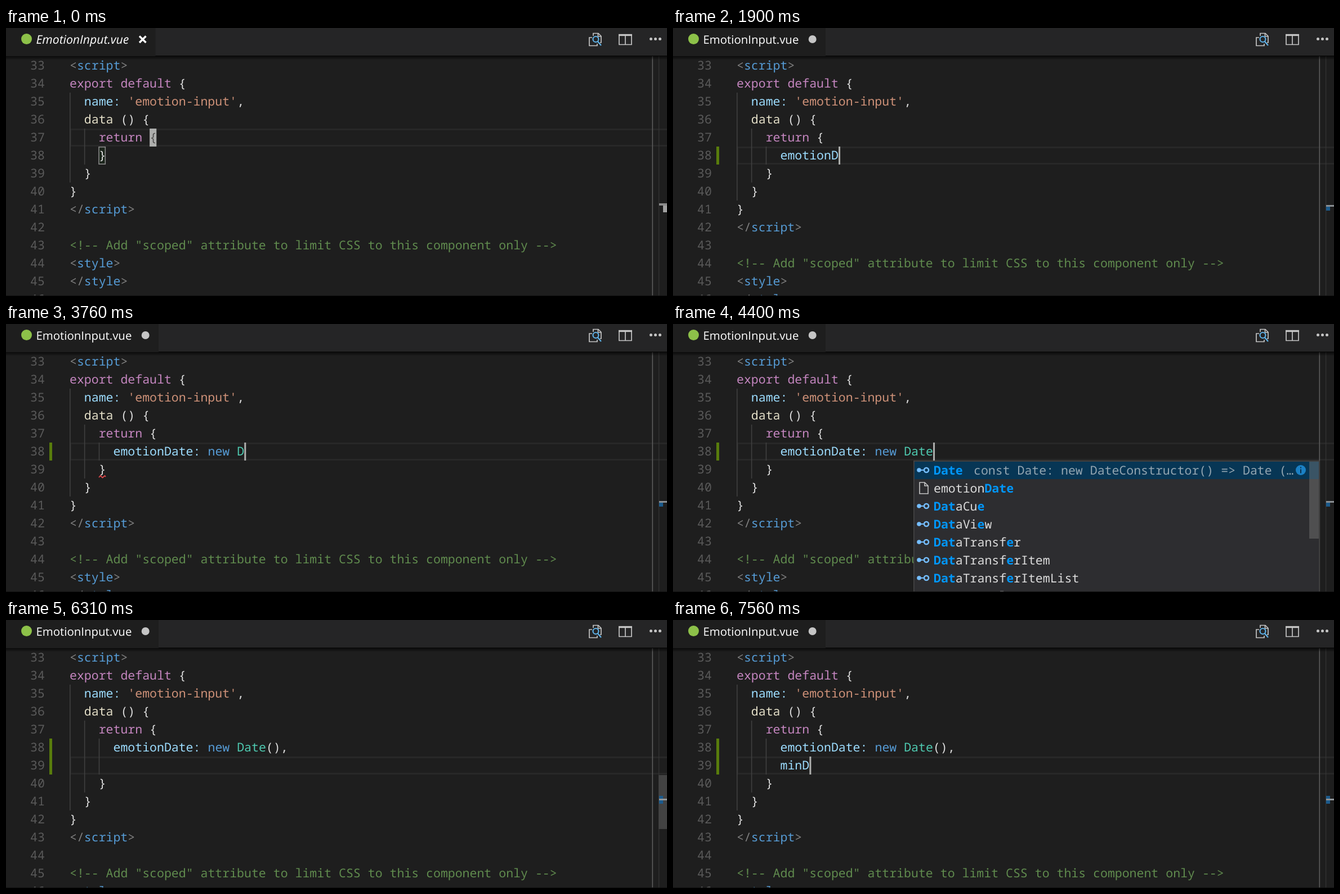
These frames come from a looping animation (1174 by 477 pixels, 8000 ms). An HTML page:

```html
<!DOCTYPE html>
<html lang="en">
<head>
<meta charset="utf-8">
<title>Typing in a code editor</title>
<style>
html, body { margin: 0; width: 100%; height: 100%; overflow: hidden; background: #1e1e1e; }
svg { display: block; }
text { text-rendering: geometricPrecision; white-space: pre; }
.mono { font: 21.53px "Noto Sans Mono", "DejaVu Sans Mono", monospace; }
.bold { font-weight: 700; }
.ui { font: 20.4px "Open Sans", "Noto Sans", sans-serif; }
.preview { font-size: 21.2px; font-style: italic; }
</style>
</head>
<body>
<svg id="stage" width="1174" height="477" viewBox="0 0 1174 477">
  <defs>
    <linearGradient id="shade" x2="0" y2="1">
      <stop offset="0" stop-color="#000" stop-opacity=".75"/>
      <stop offset="1" stop-color="#000" stop-opacity="0"/>
    </linearGradient>
  </defs>
  <rect width="1174" height="477" fill="#1e1e1e"/>
  <g id="editor"></g>
  <rect y="49" width="1174" height="8" fill="url(#shade)"/>
  <rect width="1174" height="49" fill="#252526"/>
  <g id="tab"></g>
  <circle cx="36.5" cy="19.5" r="9.5" fill="#8dc149"/>
  <g fill="none" stroke="#c5c5c5" stroke-width="1.7">
    <path d="M1043 14V9.500H1052L1057 14.500V26H1055M1041 17H1036V31.500H1050V28"/>
    <path d="M1051.500 9.500V15H1057"/>
    <g stroke="#5fb2e8" stroke-width="2.200">
      <circle cx="1047.500" cy="20" r="5"/>
      <path d="M1051 24L1057 31"/>
    </g>
    <path d="M1089 12H1111V29.500H1089ZM1100 12V30"/>
    <path d="M1088 12.500H1112" stroke-width="3.300"/>
  </g>
  <g fill="#c5c5c5">
    <circle cx="1145.500" cy="19.500" r="2.500"/>
    <circle cx="1153.500" cy="19.500" r="2.500"/>
    <circle cx="1161.500" cy="19.500" r="2.500"/>
  </g>
  <rect y="476" width="1174" height="1" fill="#111"/>
</svg>
<script>
const LOOP = 8000, CHAR = 12.92, LEFT = 113, LINE = 32, BASE = 23;
const COLORS = {
  w: '#dcdcdc', g: '#808080', t: '#569cd6', k: '#c586c0', p: '#9cdcfe', s: '#ce9178',
  f: '#e4dfc8', c: '#608b4e', d: '#4ec9b0', n: '#5a5a5a', h: '#0097fb', m: '#93a5b1'
};

// Each token starts with its colour key.
const HEAD = [
  ['g<', 'tscript', 'g>'],
  ['kexport default', 'w {'],
  ['p  name: ', "s'emotion-input'", 'w,'],
  ['f  data', 'w () {'],
  ['k    return', 'w {']
];
const FIRST = ['pemotionDate:', 't new ', 'dDate', 'w(),'];
const SECOND = ['pminD'];
const TAIL = [
  ['w    }'], ['w  }'], ['w}'],
  ['g</', 'tscript', 'g>'], [],
  ['c<!-- Add "scoped" attribute to limit CSS to this component only -->'],
  ['g<', 'tstyle', 'g>'],
  ['g</', 'tstyle', 'g>'], []
];
const SUGGESTIONS = [
  ['hDate'], ['wemotion', 'hDate'],
  ['hDat', 'waCu', 'he'], ['hDat', 'waVi', 'he', 'ww'],
  ['hDat', 'waTransf', 'he', 'wr'], ['hDat', 'waTransf', 'he', 'wrItem'],
  ['hDat', 'waTransf', 'he', 'wrItemList'], ['wHTML', 'hDat', 'wa', 'hE', 'wlement']
];

// a, b: characters typed on the first and second new line
const STEPS = [
  { at: 0, start: true },
  { at: 630, a: 1 },
  { at: 1250, a: 7 },
  { at: 1900, a: 8 },
  { at: 2510, a: 10, empty: 319 },
  { at: 3160, a: 13, error: true },
  { at: 3760, a: 18, error: true },
  { at: 4400, a: 21, list: true },
  { at: 5040, a: 23, match: true },
  { at: 5660, a: 24 },
  { at: 6310, a: 24, b: 0, slider: true },
  { at: 6910, a: 24, b: 2, empty: 217 },
  { at: 7560, a: 24, b: 4 }
];

const editor = document.getElementById('editor');
const tab = document.getElementById('tab');
const lineTop = n => 211 + (n - 38) * LINE;
const colX = c => LEFT + c * CHAR;

function add(parent, tag, attrs, text) {
  const node = document.createElementNS('http://www.w3.org/2000/svg', tag);
  for (const key in attrs) node.setAttribute(key, attrs[key]);
  if (text) node.textContent = text;
  parent.append(node);
}

const box = (x, y, width, height, fill, more) =>
  add(editor, 'rect', { x, y, width, height, fill, ...more });
const stroke = (d, color, width) =>
  add(editor, 'path', { d, fill: 'none', stroke: color, 'stroke-width': width });

// Words are set on the character grid; count cuts off what is not typed yet.
function write(tokens, x, y, count = Infinity) {
  let col = 0;
  for (const token of tokens) {
    const key = token[0], text = token.slice(1, 1 + Math.max(0, count - col));
    for (const word of text.matchAll(/\S+/g)) {
      add(editor, 'text', {
        x: x + (col + word.index) * CHAR, y, fill: COLORS[key],
        class: key === 'h' ? 'mono bold' : 'mono'
      }, word[0]);
    }
    col += token.length - 1;
  }
}

const frame = (col, n) => box(colX(col) + .3, lineTop(n) + .8, CHAR - 1.6, LINE - 1.6,
  'rgba(0,100,0,.1)', { stroke: '#888', 'stroke-width': 1.6 });

function guide(col, from, to) {
  box(colX(col), lineTop(from), 1.6, (to - from + 1) * LINE, '#404040');
}

function panel(x, y, height) {
  box(x + .8, y + .8, 720.4, height - 1.6, '#2d2d30', { stroke: '#454545', 'stroke-width': 1.6 });
}

function suggestions() {
  panel(427, 243, 260);
  box(429, 245, 718, 31, '#073655');
  box(1130, 245, 17, 137, '#797979', { opacity: .45 });
  SUGGESTIONS.forEach((tokens, i) => {
    const y = 260 + i * LINE;
    write(tokens, 463, y + 8);
    if (i === 1) {
      stroke(`M438 ${y - 10}H447L453 ${y - 4}V${y + 10}H438ZM447 ${y - 10}V${y - 4}H453`, '#c5c5c5', 1.6);
    } else {
      add(editor, 'circle', { cx: 437, cy: y, r: 3.8, fill: '#75beff' });
      stroke(`M437 ${y}H446`, '#75beff', 2);
      add(editor, 'circle', { cx: 450, cy: y, r: 4, fill: 'none', stroke: '#75beff', 'stroke-width': 2.6 });
    }
  });
  write(['mconst Date: new DateConstructor() => Date (…'], 534, 268);
  add(editor, 'circle', { cx: 1115, cy: 260, r: 9, fill: '#1b80c4' });
  box(1114, 258.5, 2, 7, '#0a2f4a');
  box(1114, 254.5, 2, 2, '#0a2f4a');
}

function ruler(s) {
  box(1147.5, 50, 1.6, 427, '#5c5c5c');
  box(1159, 50, 1.2, 427, '#343434');
  if (s.start) {
    box(1160, 312, 14, 4, '#8a8a8a');
    box(1167, 316, 7, 12, '#a0a0a0');
    return;
  }
  if (s.slider) box(1159, 276, 15, 96, '#424242');
  if (s.b !== undefined) {
    box(1160, 313, 7, 14, '#1b5a8c');
    box(1160, 318, 14, 3, '#8f9599');
  } else {
    box(1160, 317, 7, 8, '#1b5a8c');
    if (s.match) box(1167, 315, 7, 10, '#a0a0a0');
    box(1160, 315, 14, 3, '#8a8f93');
  }
}

function drawTab(s) {
  tab.replaceChildren();
  add(tab, 'rect', { width: s.start ? 265.5 : 271, height: 50, fill: '#1e1e1e' });
  add(tab, 'text', { x: 53.5, y: 28, fill: '#fff', class: s.start ? 'ui preview' : 'ui' }, 'EmotionInput.vue');
  if (s.start) {
    add(tab, 'path', { d: 'M237 14.500L248.500 26M248.500 14.500L237 26', stroke: '#fff', 'stroke-width': 3.4 });
  } else {
    add(tab, 'circle', { cx: 247.7, cy: 20, r: 7, fill: '#c5c5c5' });
  }
}

function draw(s) {
  const second = s.b !== undefined;
  const added = s.start ? 0 : second ? 2 : 1;
  const current = 37 + added;
  const lines = [...HEAD, ...[FIRST, SECOND].slice(0, added), ...TAIL];
  editor.replaceChildren();

  // The current line runs past the right edge.
  box(LEFT + 1.5, lineTop(current) + 1.5, 1100, LINE - 3, 'none', { stroke: '#282828', 'stroke-width': 3 });
  guide(0, 35, 39 + added);
  guide(2, 37, 38 + added);
  if (added) {
    guide(4, 38, current);
    box(77, lineTop(38), 5, LINE * added, '#587c0c');
  }
  if (s.start) {
    box(colX(11), lineTop(37), CHAR - .8, LINE, '#aeafad');
    frame(4, 38);
  }
  if (s.match) {
    frame(27, 38);
    frame(28, 38);
  }

  lines.slice(0, 14).forEach((tokens, i) => {
    const y = lineTop(33 + i) + BASE;
    write(['n' + (33 + i)], 43, y);
    if (tokens === FIRST) write(tokens, colX(6), y, s.a);
    else if (tokens === SECOND) write(tokens, colX(6), y, s.b);
    else write(tokens, LEFT, y);
  });

  if (s.start) add(editor, 'text', { x: colX(11), y: lineTop(37) + BASE, fill: '#4a4a48', class: 'mono' }, '{');
  if (s.error) stroke('M165 273l2.500 -3l4 3.500l4 -3.500l1.500 2', '#e0484c', 1.7);
  if (!s.start && !s.slider) {
    box(colX(6 + (second ? s.b : s.a)) + .2, lineTop(current), 3, LINE, '#aeafad');
  }

  ruler(s);
  if (s.list) suggestions();
  if (s.empty) {
    const y = lineTop(current + 1);
    panel(s.empty, y, LINE);
    write(['wNo suggestions.'], s.empty + 37, y + BASE);
  }
  drawTab(s);
}

let shown;
function tick() {
  const t = performance.now() % LOOP;
  const step = STEPS.findLast(s => s.at <= t);
  if (step !== shown) draw(shown = step);
  requestAnimationFrame(tick);
}
tick();
</script>
</body>
</html>
```
